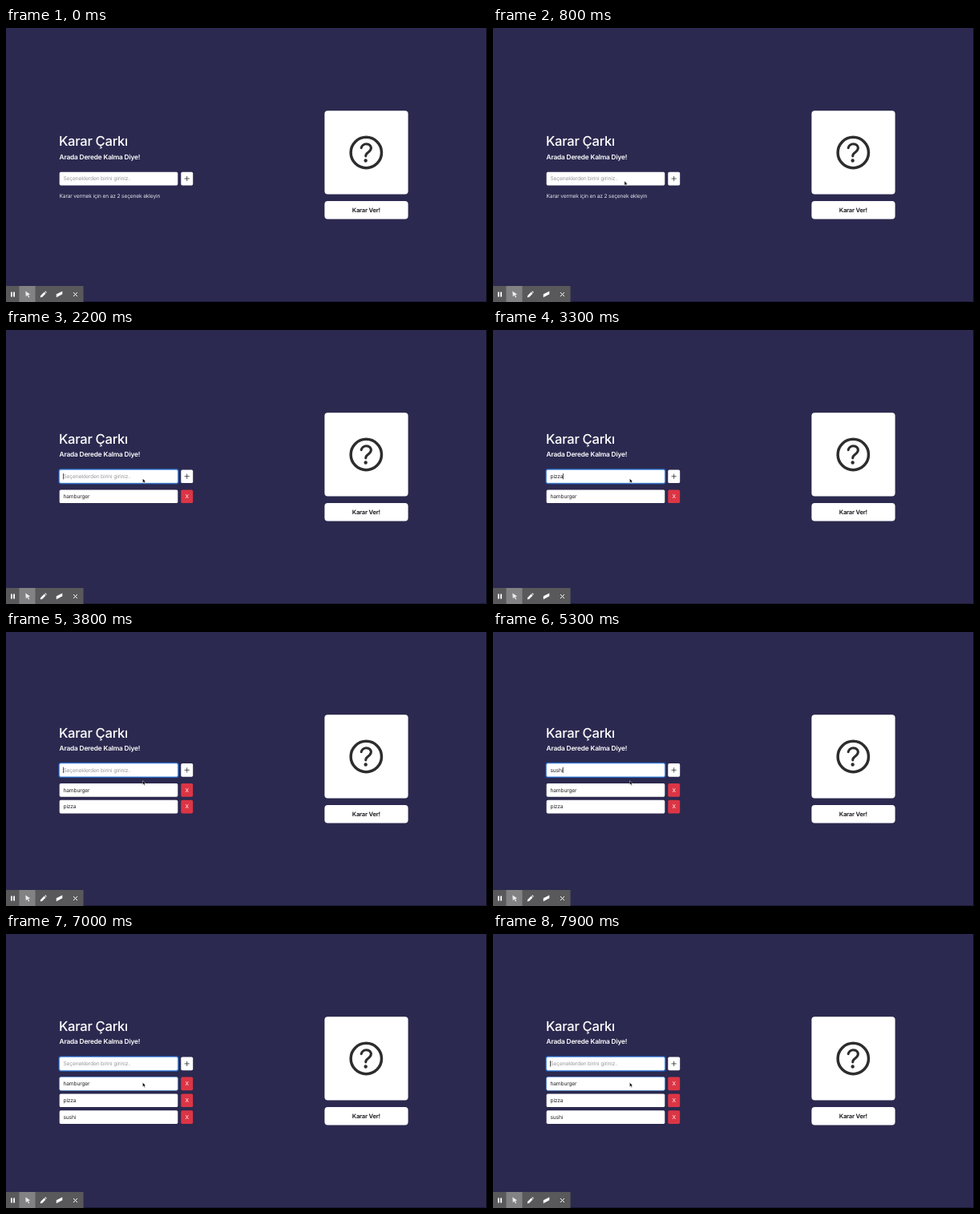
An HTML page for the animation above (8000 ms loop, 600 by 342 pixels).

```html
<!DOCTYPE html>
<html lang="tr">
<head>
<meta charset="utf-8">
<title>Karar Çarkı</title>
<style>
  html, body { margin: 0; width: 100%; height: 100%; overflow: hidden; background: #2b294f; }
  svg { display: block; width: 600px; height: 342px; }
  text { font: 400 6.67px Inter, "Liberation Sans", sans-serif; letter-spacing: -.025em; fill: #26262b;
    text-rendering: geometricPrecision; white-space: pre; }
  .title { font-size: 16.67px; font-weight: 500; letter-spacing: -.02em; fill: #fff; }
  .sub { font-size: 8.33px; font-weight: 600; letter-spacing: -.022em; fill: #fff; }
  .hint { fill: #e2e2ea; }
  .faint { fill: #98989e; }
  .mid { text-anchor: middle; }
  .go { font-size: 7.5px; font-weight: 700; }
  .x { fill: #fff; }
  .line { fill: none; stroke: #2d2d2f; }
</style>
</head>
<body>
<svg viewBox="0 0 600 342">
  <rect width="600" height="342" fill="#2b294f"/>
  <rect x="599" width="1" height="342" fill="#0b0b16"/>
  <rect y="341" width="600" height="1" fill="#1d1b39"/>

  <g id="panel">
    <text class="title" x="66" y="147.4">Karar Çarkı</text>
    <text class="sub" x="66.5" y="163.6">Arada Derede Kalma Diye!</text>
    <rect id="ring" x="66" y="179" width="149" height="18.1" rx="2.2" fill="none" stroke="#1670e8" stroke-opacity=".6" stroke-width="1.3"/>
    <rect id="field" x="66.7" y="179.7" width="147.6" height="16.7" rx="1.7" fill="#fff"/>
    <text id="ghost" class="faint" x="71.5" y="190.3">Seçeneklerden birini giriniz..</text>
    <text id="entry" x="71.5" y="190.3"></text>
    <rect id="caret" y="184.3" width=".7" height="7.4" fill="#111"/>
    <rect x="218.3" y="179.7" width="14.9" height="16.7" rx="1.7" fill="#fff"/>
    <path class="line" stroke-width=".8" d="M222.6 188h6.2M225.7 184.9v6.2"/>
    <text id="hint" class="hint" x="66.5" y="212.2">Karar vermek için en az 2 seçenek ekleyin</text>
    <g id="list"></g>
  </g>

  <rect x="397.4" y="103.3" width="104.2" height="104.3" rx="4" fill="#fff"/>
  <g class="line" transform="translate(449.3 155.5) scale(.109) translate(-256 -256)" stroke-linecap="round">
    <circle cx="256" cy="256" r="176" stroke-width="32"/>
    <path stroke-width="28" d="M200 202s1-17 20-32c11-9 24-12 36-12 11 0 21 2 27 4 10 5 29 17 29 42 0 26-17 38-36 51s-25 27-25 41"/>
    <circle cx="250" cy="348" r="20" fill="#2d2d2f" stroke="none"/>
  </g>
  <rect x="397.4" y="215.9" width="104.2" height="22.7" rx="4" fill="#fff"/>
  <text class="go mid" x="449.3" y="229.9">Karar Ver!</text>

  <rect y="322" width="96.6" height="20" fill="#59595b"/>
  <rect x="16.5" y="322" width="20" height="20" fill="#828284"/>
  <g fill="#fff">
    <path d="M6 329.4h1.8v6.2H6zM9.2 329.4H11v6.2H9.2z"/>
    <path d="M24.3 328.4l6 4-2.6.5 1.6 2.9-1.1.6-1.6-2.9-1.8 1.8z" fill="#ececec"/>
    <path d="M42.8 336.2l.4-2.1 4.5-4.5 1.8 1.8-4.5 4.5zM48.3 329l.8-.8 1.8 1.8-.8.8z"/>
    <path d="M62.8 332.3l7.5-3.9v3.9l-7.5 4z"/>
    <path d="M84 330l5 5m0-5l-5 5" fill="none" stroke="#fff"/>
  </g>

  <path id="arrow" d="M0 0v5.2l1.3-1.1.9 2 .9-.4-.9-1.9h1.6z" fill="#000" stroke="#fff" stroke-width=".4"/>
  <path id="beam" d="M-1.2-3q1.2 0 1.2 1 0-1 1.2-1M0-2v4M-1.2 3q1.2 0 1.2-1 0 1 1.2 1" fill="none" stroke="#777" stroke-width=".6"/>
</svg>
<script>
const $ = id => document.getElementById(id);
const show = (id, on) => $(id).style.display = on ? '' : 'none';
const LOOP = 8000, FOCUS = 900, START = [19, 315], END = [170.5, 185.5];

// Each word: time of every key press, then of the Enter key
const words = [
  { text: 'hamburger', keys: [1100, 1200, 1300, 1400, 1500, 1600, 1700, 1700, 1800], enter: 2200 },
  { text: 'pizza', keys: [2700, 2900, 3000, 3100, 3300], enter: 3800 },
  { text: 'sushi', keys: [4100, 4600, 5100, 5200, 5300], enter: 5500 }
];
const events = [FOCUS, ...words.flatMap(w => [...w.keys, w.enter])];

$('list').innerHTML = words.map((w, i) => `
  <g id="item${i}" transform="translate(0 ${25 + i * 20.8})">
    <rect id="box${i}" x="66.7" y="179.7" width="147.6" height="16.7" rx="1.7" fill="#fff"/>
    <text x="71.5" y="190.3">${w.text}</text>
    <rect x="218.3" y="179.7" width="14.9" height="16.7" rx="1.7" fill="#dc3545"/>
    <text class="x mid" x="225.7" y="190.4">X</text>
  </g>`).join('');

function outline(id, on) {
  $(id).setAttribute('stroke', on ? '#6aaef8' : 'none');
  $(id).setAttribute('stroke-width', .7);
}

function draw(now) {
  const t = Math.floor(now % LOOP / 100) * 100;
  const count = words.filter(w => t >= w.enter).length;
  const word = words[count];
  const typed = word ? word.text.slice(0, word.keys.filter(k => t >= k).length) : '';
  const focused = t >= FOCUS;

  const lift = count ? 5.3 + (count - 1) * 10.4 : 0;
  $('panel').setAttribute('transform', `translate(0 ${-lift})`);
  words.forEach((w, i) => show('item' + i, i < count));
  show('hint', !count);
  show('ghost', !typed);
  show('ring', focused);
  outline('field', focused);
  outline('box0', count === 3);

  $('entry').textContent = typed;
  const last = Math.max(...events.filter(e => e <= t));
  show('caret', focused && Math.floor((t - last) / 500) % 2 === 0);
  $('caret').setAttribute('x', 71.2 + (typed ? $('entry').getComputedTextLength() : 0));

  const p = Math.min(1, Math.max(0, (t - 100) / (FOCUS - 100)));
  const ease = p * p * (3 - 2 * p);
  const [x, y] = START.map((s, i) => s + (END[i] - s) * ease);
  const overField = focused && !count;
  show('beam', overField);
  show('arrow', t >= 100 && !overField);
  for (const id of ['beam', 'arrow']) $(id).setAttribute('transform', `translate(${x} ${y})`);
}

const begin = performance.now();
function tick() {
  draw(performance.now() - begin);
  requestAnimationFrame(tick);
}
tick();
</script>
</body>
</html>
```
